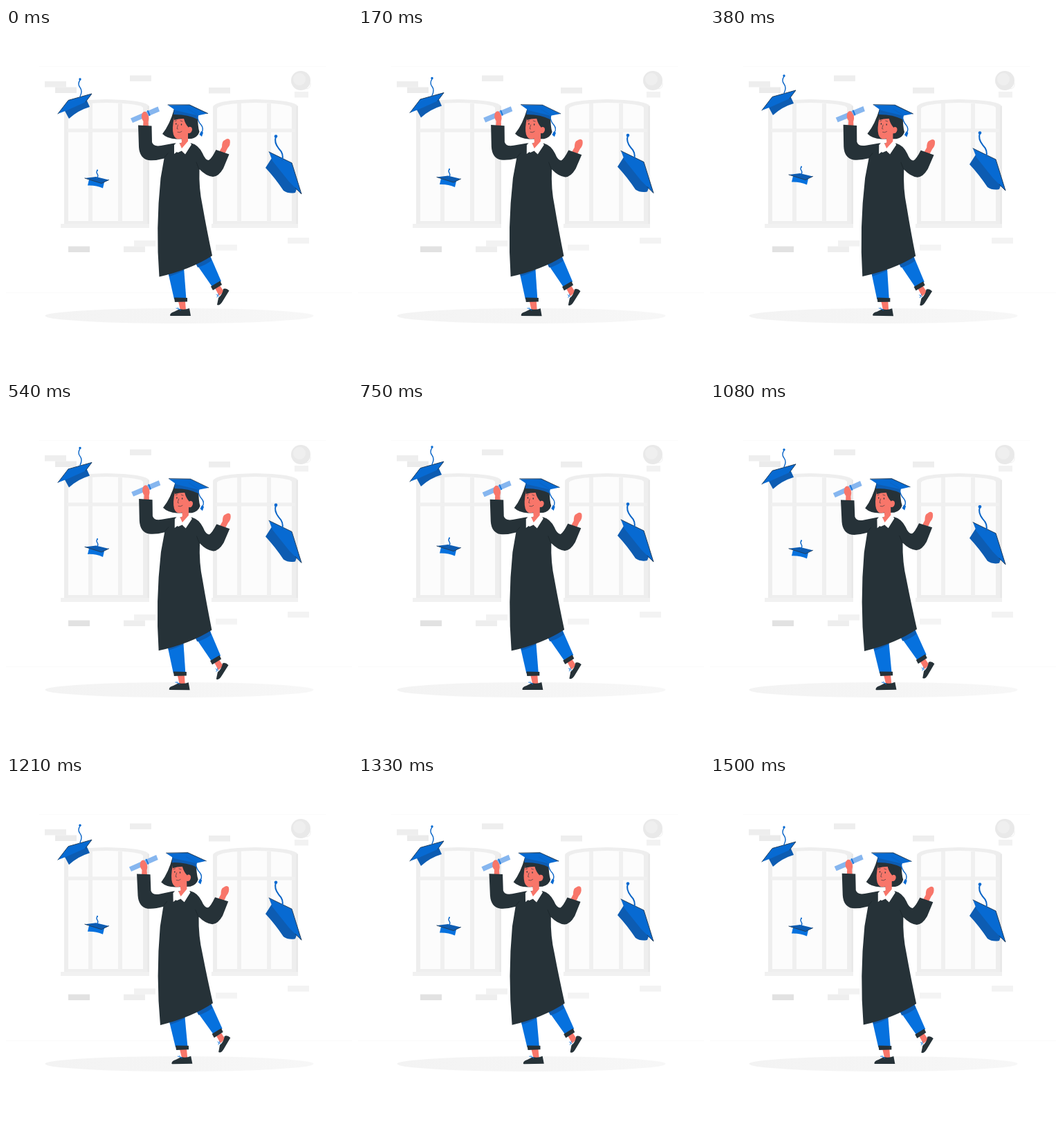
Write an HTML page that moves like this. It is 500 by 500 pixels and loops after 1.54 s.

```html
<!DOCTYPE html>
<html lang="en">
<head>
<meta charset="utf-8">
<title>Graduation</title>
<style>
  html, body { margin: 0; width: 100%; height: 100%; overflow: hidden; background: #fff; }
  svg { display: block; width: 100%; height: 100%; }
  .ink { fill: #263238; }
  .blue { fill: #0671de; }
  .board { fill: #076ad2; }
  .deep { fill: #0d5cb2; }
  .skin { fill: #f8766a; }
  .line { fill: none; stroke-linecap: round; stroke-linejoin: round; }
  .cord { stroke: #0b65c7; stroke-width: 1.4; }
  .thick { stroke-width: 2; }
  .edge { stroke: #203e5e; stroke-width: 1; }
  .face { stroke: #263238; stroke-width: .6; }
</style>
</head>
<body>
<svg viewBox="0 0 500 500">
  <defs>
    <linearGradient id="floor" x2="1" y2="0">
      <stop stop-color="#f3f3f3"/><stop offset="1" stop-color="#f7f7f7"/>
    </linearGradient>
    <g id="window">
      <path fill="#eee" d="M84 283V114Q87 104 145 103Q202 104 207 113V283Z"/>
      <path fill="#fcfcfc" d="M90 279V116Q95 109 145 108Q193 109 198 115V279Z"/>
      <path fill="none" stroke="#f0f0f0" stroke-width="6" d="M122 109V280M165 109V280"/>
      <path fill="none" stroke="#f0f0f0" stroke-width="5" d="M88 148H203"/>
      <path fill="none" stroke="#e8e8e8" stroke-width="2.500" d="M205.700 113V283"/>
    </g>
  </defs>

  <path fill="none" stroke="#fafafa" d="M48 55.5H462M0 382.5H500"/>
  <g id="bricks"></g>
  <use href="#window"/>
  <use href="#window" x="215"/>
  <path fill="#f1f1f1" d="M79 283H207V289H79ZM297 283H422V289H297Z"/>
  <path class="line" stroke="#f0f0f0" d="M433 88Q441 88 440 80"/>
  <circle cx="426" cy="76" r="14" fill="#e9e9e9"/>
  <circle cx="424" cy="74" r="9" fill="#efefef"/>
  <ellipse cx="250.500" cy="416" rx="194" ry="11" fill="url(#floor)"/>

  <g id="girl">
    <!-- legs -->
    <path class="blue" d="M234 352L257 346L260.500 392H243Z"/>
    <path class="deep" d="M234 352L257 346V350.500Q248 355 236 359Z"/>
    <path class="skin" d="M249 395H259L260 408H252Z"/>
    <path class="ink" d="M243 389.500L262 390V395.500L244 396Z"/>
    <path class="ink" d="M237 415.500Q237 411.500 243 410L251 406Q258 408 265 405L267 416H238Z"/>
    <path class="line" stroke="#0671de" stroke-width=".8" d="M246 405L252 407M248 404L252 408"/>
    <path class="blue" d="M273 338L295 329L311 366L298 374Z"/>
    <path class="deep" d="M273 338L295 329L297 336Q288 343 277 346Z"/>
    <path class="skin" d="M302 376L309 372L315 381L308 387Z"/>
    <path class="ink" d="M296 373.500L309.500 365.500L312 371L299 379Z"/>
    <path class="ink" d="M305 400L307 390Q313 385 314 377Q318 375 322.500 379.500L313 395Q309 402 305 400Z"/>
    <path class="line" stroke="#0671de" stroke-width=".8" d="M304 385L308 388M305 389L307 384"/>

    <!-- scroll and hands -->
    <path fill="#86b6ef" d="M180 130.500L219.500 113.500L222 120.500L183 137Z"/>
    <path class="line" stroke="#1f78d8" stroke-width="2" d="M205 120L207.500 126"/>
    <path class="skin" d="M198 144L198.500 135Q194 129 197 123Q200 119 203 122L206 127Q207 131 205.500 136L206 144Z"/>
    <path class="skin" d="M307 181L312 172Q312 163 316 162Q321 158 323.500 162Q325 169 320 174L315 184Z"/>

    <!-- gown -->
    <path class="ink" d="M191 140.500L210.500 141.500L211 165Q213 172 224 170L243 166.500H268Q278 169 284 181Q288 191 293 191Q297 189 303.500 176L322.500 182.500L314 203Q307 215 299 215Q289 214 279.500 204Q278.500 232 284 257Q290 291 298 329Q267 349 221.500 359.500Q216 289 223.500 217L228.500 188.500Q216 192 206 191Q193 188.500 192 172Z"/>
    <path class="line" stroke="#1b252a" stroke-width=".8" d="M279 204L275 194M229 187L234 181"/>

    <!-- head -->
    <path class="ink" d="M243 117Q237 139 226 153Q233 160 246 160.500L268 160Q277 158 279.500 150Q277 143 277 124Z"/>
    <path class="skin" d="M253 155L263 151V164L266 169L254 181L248 170L254 165Z"/>
    <path class="skin" d="M243 129Q239.500 146 242 154Q245 162 252 160Q260 158 263 152Q268 153 269 147Q269 142 264 143L260 131Z"/>
    <path class="ink" d="M242 122L262 126L266 133L264 144Q259 139 257 131Q249 131 243 133Z"/>
    <path class="line face" d="M244 134.500L246.500 133.800M252 134L255 135M248.500 140L247 145.500L248.500 146M248 150.500Q251 152 254 149.500"/>
    <ellipse class="ink" cx="245.800" cy="138.500" rx=".7" ry="1.200"/>
    <ellipse class="ink" cx="253.500" cy="139.500" rx=".7" ry="1.200"/>
    <path fill="#fff" d="M249 163L243 169L243 182L247 179L250 182L254 178L259 182.500L268 168.500L264 162.500L254 174Z"/>
    <path class="ink" d="M246 181L254 177.500L258 183L250 184Z"/>

    <!-- cap -->
    <path class="deep" d="M243 115L279 122L277 132Q262 124.500 242 125Z"/>
    <path class="board" d="M234 111.500L265 111L291.500 123.500L277 126.500L245 119Z"/>
    <path class="line edge" d="M234 111L265 111L291.500 123.500"/>
    <path class="line cord" d="M263 117L276 125Q277 135 282 140Q286 145 283 151"/>
    <path class="board" d="M282 149L285 151L283 157L279.500 154Z"/>
  </g>

  <g class="toss">
    <path class="deep" d="M84 118L116 103L121 114Q104 119 91 131Z"/>
    <path class="board" d="M75 124L90 104.500L124 95L115 107L88 119Z"/>
    <path class="line edge" d="M75 124L90 104.500L124 95L115 107"/>
    <path class="line cord" d="M107 99Q111 91 107 86T107 75"/>
    <circle class="board" cx="107" cy="74" r="1.700"/>
  </g>
  <g class="toss">
    <path class="blue" d="M120 219L142 223L140 231.500Q130 227 118 227.500Z"/>
    <path class="deep" d="M114 217L130 215L148.500 219.500L138 224.500Z"/>
    <path class="line edge" d="M114 217L138 224.500L148.500 219.500"/>
    <path class="line cord" d="M131 218Q134 214 132 211T132 206"/>
    <circle class="board" cx="132" cy="205.500" r="1"/>
  </g>
  <g class="toss">
    <path class="deep" d="M384 188L375 202Q389 217 401 235Q408 240 418 238L421 230Z"/>
    <path class="board" d="M380 179L413 195L427 240L409 222L385 192Z"/>
    <path class="line edge" d="M380 179L413 195L427 240L418 231"/>
    <path class="line cord thick" d="M399 191Q402 182 394 174Q387 165 390 157"/>
    <circle class="board" cx="390" cy="156.500" r="2.300"/>
  </g>
</svg>
<script>
  const LOOP = 1540;
  const girl = document.getElementById('girl');
  const caps = document.querySelectorAll('.toss');

  const brick = (x, y, fill = '#eee', width = 31) =>
    `<rect x="${x}" y="${y}" width="${width}" height="8.500" fill="${fill}"/>`;
  document.getElementById('bricks').innerHTML = [
    brick(56, 77), brick(71, 85.5, '#ebebeb'), brick(179, 68.5), brick(293, 86),
    brick(407, 303, '#f3f3f3'), brick(185, 307, '#f2f2f2'), brick(170, 315.5),
    brick(90, 315.5, '#e2e2e2'), brick(303, 313, '#f4f4f4'), brick(417, 92, '#f2f2f2', 20)
  ].join('');

  const wave = (time, peak) => Math.cos((time - peak) / LOOP * 2 * Math.PI);

  function draw(now) {
    const time = now % LOOP;
    const sway = 0.85 * (wave(time, 355) - wave(0, 355));
    const lift = 4.5 * (wave(time, -35) - wave(0, -35));
    girl.setAttribute('transform', `rotate(${sway} 250 265)`);
    for (const cap of caps) cap.setAttribute('transform', `translate(0 ${lift})`);
  }

  const start = performance.now();
  function tick() {
    draw(performance.now() - start);
    requestAnimationFrame(tick);
  }
  tick();
</script>
</body>
</html>
```
